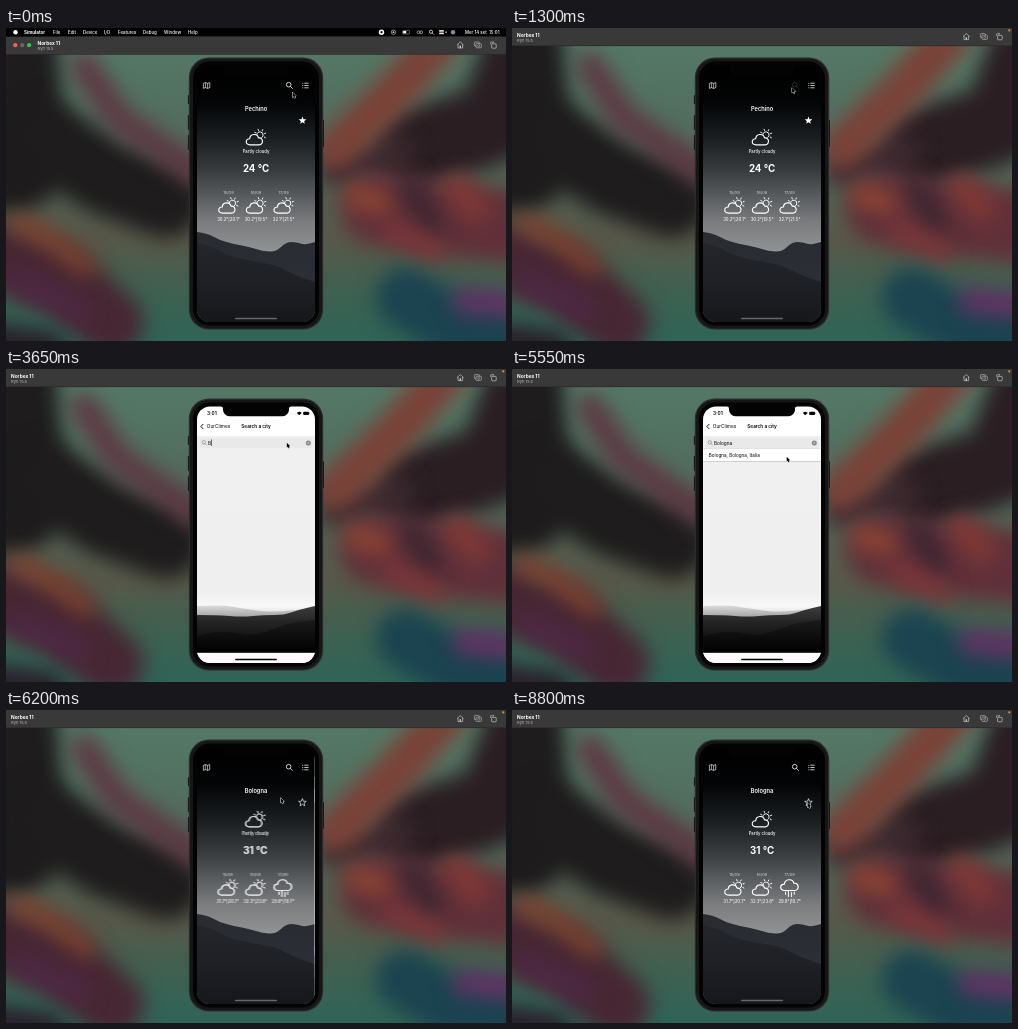
Recreate the animation shown at these times as an HTML page with a canvas. Size 500 px wide and 313 px high, loop 8850 ms.

```html
<!DOCTYPE html>
<html lang="it">
<head>
<meta charset="utf-8">
<title>Weather app</title>
<style>
html,body{margin:0;width:100%;height:100%;overflow:hidden;background:#222}
canvas{display:block;width:500px;height:313px}
</style>
</head>
<body>
<canvas id="stage"></canvas>
<script>
const W = 500, H = 313, LOOP = 8850;
const canvas = document.getElementById('stage');
const scale = Math.max(1, window.devicePixelRatio || 1);
canvas.width = W * scale;
canvas.height = H * scale;
let c = canvas.getContext('2d');

const FONT = 'Inter, "Liberation Sans", sans-serif';
const SCREEN = {x: 191, y: 37.5, w: 118, h: 256.5};
const clamp = v => Math.max(0, Math.min(1, v));
const span = (t, a, b) => clamp((t - a) / (b - a));
const mix = (a, b, p) => a + (b - a) * p;
const easeOut = p => 1 - (1 - p) ** 3;
const smooth = p => p * p * (3 - 2 * p);

function text(s, x, y, size, color = '#fff', weight = 400, align = 'left') {
  c.font = `${weight} ${size}px ${FONT}`;
  c.fillStyle = color;
  c.textAlign = align;
  c.fillText(s, x, y);
}
function rect(x, y, w, h, color) {
  c.fillStyle = color;
  c.fillRect(x, y, w, h);
}
function roundPath(x, y, w, h, r) {
  c.beginPath();
  c.moveTo(x + r, y);
  c.arcTo(x + w, y, x + w, y + h, r);
  c.arcTo(x + w, y + h, x, y + h, r);
  c.arcTo(x, y + h, x, y, r);
  c.arcTo(x, y, x + w, y, r);
  c.closePath();
}
function round(x, y, w, h, r, color) {
  roundPath(x, y, w, h, r);
  c.fillStyle = color;
  c.fill();
}
function dot(x, y, r, color) {
  c.beginPath();
  c.arc(x, y, r, 0, 7);
  c.fillStyle = color;
  c.fill();
}
function ring(x, y, r, color, width) {
  c.beginPath();
  c.arc(x, y, r, 0, 7);
  stroke(color, width);
}
function stroke(color, width) {
  c.strokeStyle = color;
  c.lineWidth = width;
  c.stroke();
}
// Polyline from a flat list of coordinates
function line(pts, color, width, close) {
  c.beginPath();
  for (let i = 0; i < pts.length; i += 2) c.lineTo(pts[i], pts[i + 1]);
  if (close) c.closePath();
  stroke(color, width);
}
function fade(y0, y1, ...stops) {
  const g = c.createLinearGradient(0, y0, 0, y1);
  stops.forEach(([p, col]) => g.addColorStop(p, col));
  return g;
}
// Smooth ridge filled down to the given bottom
function ridge(pts, bottom, fill) {
  const n = pts.length;
  c.beginPath();
  c.moveTo(pts[0], bottom);
  c.lineTo(pts[0], pts[1]);
  for (let i = 2; i < n - 2; i += 2)
    c.quadraticCurveTo(pts[i], pts[i + 1], (pts[i] + pts[i + 2]) / 2, (pts[i + 1] + pts[i + 3]) / 2);
  c.lineTo(pts[n - 2], pts[n - 1]);
  c.lineTo(pts[n - 2], bottom);
  c.fillStyle = fill;
  c.fill();
}

// Blurred wallpaper brush strokes: colour, width, points
const BANDS = [
  ['#1e1c1d', 110, -5, 0, 5, 130],
  ['#1e1c1d', 75, 40, 110, 100, 150, 160, 172],
  ['#5c3a44', 28, 78, 38, 112, 90, 190, 145],
  ['#472733', 66, -20, 225, 55, 250, 105, 295],
  ['#7d4230', 20, 12, 195, 45, 212, 80, 238],
  ['#4e2844', 26, 15, 255, 70, 280],
  ['#2a1f2b', 40, -10, 315, 40, 322],
  ['#2a1e23', 80, 525, 0, 490, 95, 410, 120],
  ['#3c2a30', 36, 330, 140, 390, 125],
  ['#7a4238', 42, 452, -10, 392, 60, 330, 122],
  ['#60303a', 72, 370, 180, 430, 190, 520, 200],
  ['#8c4434', 24, 350, 168, 375, 175],
  ['#7e3836', 30, 450, 160, 470, 180],
  ['#3c2630', 22, 405, 160, 425, 195],
  ['#80383a', 18, 385, 202, 430, 225],
  ['#1b4350', 60, 400, 270, 450, 300, 520, 310],
  ['#633064', 24, 458, 273, 520, 278]
];
function makeWallpaper() {
  const layer = document.createElement('canvas');
  layer.width = W;
  layer.height = H;
  const main = c;
  c = layer.getContext('2d');
  rect(0, 0, W, H, fade(20, H, [0, '#547866'], [.35, '#52695c'], [.65, '#58594a'], [.85, '#3c6152'], [1, '#2f6456']));
  c.filter = 'blur(10px)';
  c.lineCap = c.lineJoin = 'round';
  for (const [color, width, ...pts] of BANDS) line(pts, color, width);
  c = main;
  return layer;
}
const wallpaper = makeWallpaper();

function magnifier(x, y, r, color, width) {
  ring(x, y, r, color, width);
  line([x + r * .7, y + r * .7, x + r * 1.75, y + r * 1.75], color, width);
}

function menuBar(y) {
  c.save();
  c.translate(0, y);
  rect(0, 0, W, 8.5, '#000');
  dot(9.5, 4.2, 2.2, '#fff');
  text('Simulator', 18, 5.8, 4.5, '#fff', 700);
  const items = {File: 47, Edit: 62, Device: 77, 'I/O': 98, Features: 112, Debug: 137, Window: 158, Help: 182};
  for (const name in items) text(name, items[name], 5.8, 4.4, '#fff', 500);
  dot(375.5, 4.2, 2.7, '#fff');
  rect(374.5, 3.2, 2, 2, '#000');
  ring(387.5, 4.2, 2.2, '#ddd', .6);
  dot(387.5, 4.2, .9, '#ddd');
  roundPath(396.5, 2.4, 7, 3.6, 1);
  stroke('#aaa', .5);
  rect(397.2, 3, 3, 2.4, '#fff');
  ring(412.5, 4.2, 1.4, '#ddd', .6);
  ring(415.2, 4.2, 1.4, '#ddd', .6);
  magnifier(425, 3.8, 1.6, '#fff', .7);
  round(433, 2, 5, 1.8, .9, '#ddd');
  round(433, 4.5, 5, 1.8, .9, '#ddd');
  dot(440, 4.2, .9, '#f39a2b');
  dot(447, 4.2, 2.2, '#8a86a8');
  text('Mer 14 set  15:01', 493.5, 5.8, 4.4, '#fff', 500, 'right');
  c.restore();
}

function titleBar(m) {
  c.save();
  c.translate(0, 8.4 * m);
  rect(0, 0, W, 18, '#393939');
  rect(0, 17.6, W, .5, '#222');
  if (m > 0) {
    c.globalAlpha = m;
    dot(9.3, 8.8, 2.1, '#f4605a');
    dot(16.2, 8.8, 2.1, '#666');
    dot(23.1, 8.8, 2.1, '#32c748');
    c.globalAlpha = 1;
  }
  const x = mix(5, 31.5, m);
  text('Norbex 11', x, 8.5, 4.8, '#fff', 700);
  text('Ryn 15.5', x, 13.6, 4.1, '#b5b5b5');
  const col = '#c4c4c4';
  line([451, 8.6, 454.3, 5.6, 457.6, 8.6], col, .7);
  line([452, 8, 452, 11.6, 456.6, 11.6, 456.6, 8], col, .7);
  rect(453.6, 9.2, 1.4, 2.4, col);
  roundPath(468.4, 5.6, 5, 4, .7);
  stroke(col, .6);
  roundPath(470, 7.2, 5.4, 4.2, .7);
  c.fillStyle = '#393939';
  c.fill();
  stroke(col, .6);
  ring(472.7, 9.3, 1, col, .5);
  roundPath(485.6, 7.4, 4.6, 4.4, .7);
  stroke(col, .7);
  line([484.6, 8, 484.6, 5.8, 487.6, 5.8], col, .6);
  line([486.7, 4.8, 487.8, 5.8, 486.7, 6.8], col, .6);
  c.restore();
}

function phoneBody() {
  for (const [y, h] of [[67, 9], [87, 15], [107, 15]]) round(181.9, y, 3, h, .8, '#151515');
  round(315, 92, 3, 27, .8, '#151515');
  round(182.8, 29.6, 134.4, 272, 20, '#2c2c2d');
  round(184, 30.8, 132, 269.6, 19, '#161617');
  round(187, 33.6, 126, 264, 16.5, '#030303');
}

// Cloud outline, about 17 wide, centred on the origin
function cloudPath() {
  c.beginPath();
  c.moveTo(-5, 6.3);
  c.bezierCurveTo(-10, 6.3, -9.6, .2, -5.2, .2);
  c.bezierCurveTo(-4.8, -5, 2.6, -5.4, 3.6, -.6);
  c.bezierCurveTo(8.6, -1.4, 9, 6.3, 4.2, 6.3);
  c.closePath();
}
function weatherIcon(x, y, rain) {
  c.save();
  c.translate(x, y);
  c.lineCap = 'round';
  if (rain) {
    c.save();
    c.translate(.4, -4);
    c.scale(1.08, 1.05);
    cloudPath();
    stroke('#fff', 1.1);
    c.restore();
    for (const [dx, dy, n] of [[-4, 4, 2.6], [-1.2, 3, 5.6], [1.8, 4.4, 4.4], [4.6, 4, 2.6]])
      line([dx, dy, dx, dy + n], '#fff', 1);
  } else {
    c.beginPath();
    c.arc(4.1, -2.6, 3.1, Math.PI * 1.06, Math.PI * 2.32);
    stroke('#fff', 1);
    for (let i = 0; i < 5; i++) {
      const a = Math.PI * (1.15 + i * .25), u = Math.cos(a), v = Math.sin(a);
      line([4.1 + u * 4.6, -2.6 + v * 4.6, 4.1 + u * 6, -2.6 + v * 6], '#fff', .95);
    }
    c.save();
    c.translate(-1, .9);
    cloudPath();
    stroke('#fff', 1.15);
    c.restore();
  }
  c.restore();
}
function star(x, y, filled) {
  c.beginPath();
  for (let i = 0; i < 10; i++) {
    const a = -Math.PI / 2 + i * Math.PI / 5, r = i % 2 ? 1.7 : 4;
    c.lineTo(x + Math.cos(a) * r, y + Math.sin(a) * r);
  }
  c.closePath();
  c.lineJoin = 'round';
  if (filled) {
    c.fillStyle = '#fff';
    c.fill();
  } else stroke('#fff', .65);
}

const PLACES = {
  Pechino: {now: '24 °C', days: ['30.2°|20.1°', '30.2°|19.5°', '32.1°|21.5°'], star: true},
  Bologna: {now: '31 °C', days: ['31.7°|20.7°', '32.3°|23.8°', '29.8°|19.7°'], rain: true}
};

function forecast(place) {
  weatherIcon(249.9, 109.6);
  text('Partly cloudy', 250, 124.8, 4.25, '#fff', 500, 'center');
  text(place.now, 250, 143.8, 9.7, '#fff', 700, 'center');
  place.days.forEach((s, i) => {
    const x = 222.4 + i * 27.6;
    text(`${15 + i}/09`, x, 165.8, 4, '#d2d2d2', 400, 'center');
    weatherIcon(x, 177.9, place.rain && i === 2);
    text(s, x, 192.8, 4.25, '#f5f5f5', 500, 'center');
  });
}

function homeView(name, searchAlpha, ghost) {
  const place = PLACES[name];
  rect(191, 37, 118, 258, fade(37, 222,
    [0, '#000'], [.2, '#030405'], [.4, '#1b1f22'], [.56, '#373a3d'], [.69, '#54575a'], [.85, '#7a7c7e'], [1, '#909193']));
  ridge([191, 204, 201, 205, 213, 212, 228, 216, 244, 219, 256, 223, 270, 224, 280, 214, 291, 214, 298, 217, 309, 214], 295,
    fade(203, 260, [0, '#292b31'], [1, '#2c2f36']));
  ridge([191, 215, 204, 217, 222, 228, 246, 233, 270, 237, 288, 247, 309, 254], 295,
    fade(215, 294, [0, '#24262b'], [.5, '#1e2025'], [1, '#15171b']));

  line([197.4, 55.4, 199.4, 54.6, 201.6, 55.4, 203.8, 54.6, 203.8, 59.6, 201.6, 60.4, 199.4, 59.6, 197.4, 60.4], '#fff', .65, true);
  line([199.4, 54.6, 199.4, 59.6], '#fff', .6);
  line([201.6, 55.4, 201.6, 60.4], '#fff', .6);
  c.globalAlpha = searchAlpha;
  magnifier(282.7, 56.7, 2.3, '#fff', .8);
  c.globalAlpha = 1;
  for (const y of [55.2, 57.5, 59.8]) {
    dot(296.8, y, .5, '#fff');
    line([298.4, y, 302.6, y], '#fff', .75);
  }
  text(name, 250, 83.1, 5.7, '#fff', 600, 'center');
  star(296.5, 92.6, place.star);
  if (ghost) {
    c.globalAlpha = .6;
    forecast(place);
    c.translate(-1.1, 0);
    forecast(place);
    c.translate(1.1, 0);
    c.globalAlpha = 1;
  } else forecast(place);
  round(229, 289.8, 42, 1.4, .7, '#66676a');
}

const KEYS = [3650, 3850, 3950, 4100, 4200, 4300, 4350];
const BLINKS = [2100, 2475, 2725, 3150, 3375, 4550];

function searchView(t) {
  const typed = 'Bologna'.slice(0, KEYS.filter(k => t >= k).length);
  rect(191, 37, 118, 258, '#fff');
  rect(191, 67, 118, 217, fade(67, 246, [0, '#f0f0f0'], [.88, '#efefef'], [.95, '#f8f8f8'], [1, '#dedede']));
  ridge([191, 237, 215, 236, 235, 239, 260, 243, 280, 242, 309, 239], 284,
    fade(235, 249, [0, '#e2e2e2'], [1, '#a0a0a0']));
  ridge([191, 246, 210, 246, 236, 248, 258, 246, 278, 246, 292, 241, 309, 237], 284,
    fade(238, 270, [0, '#3c3c3c'], [.45, '#252525'], [1, '#121212']));
  ridge([191, 267, 205, 263, 226, 263, 248, 267, 270, 259, 284, 254, 309, 251], 284,
    fade(250, 284, [0, '#1b1b1b'], [1, '#000']));
  rect(191, 283.8, 118, 11, '#fdf9fd');
  round(229, 289.8, 42, 1.5, .75, '#000');

  text('3:01', 201, 46.2, 4.8, '#000', 600);
  for (let i = 0; i < 4; i++) dot(285.2 + i * 1.4, 44.8, .35, '#aaa');
  c.beginPath();
  c.moveTo(293.3, 46.2);
  c.arc(293.3, 46.2, 3.3, -Math.PI * .76, -Math.PI * .24);
  c.fillStyle = '#000';
  c.fill();
  round(297.2, 42.8, 5.8, 3.2, .9, '#000');
  rect(303.3, 43.8, .5, 1.2, '#555');

  line([197.3, 55, 194.8, 57.5, 197.3, 60], '#000', .95);
  text('OurClimes', 200.8, 59.3, 4.75, '#000');
  text('Search a city', 250, 59.3, 4.7, '#000', 600, 'center');

  round(193.5, 68.8, 113, 10.4, 2.5, '#e9e9ea');
  magnifier(197.8, 73.3, 1.7, '#77777b', .6);
  if (typed) {
    text(typed, 202, 75.8, 4.7, '#000');
    dot(302.3, 73.9, 2.5, '#858589');
    line([301.4, 73, 303.2, 74.8], '#eee', .5);
    line([303.2, 73, 301.4, 74.8], '#eee', .5);
  } else text('Search a city, address, etc...', 203, 75.8, 4.6, '#909094');
  if (BLINKS.filter(k => t >= k).length % 2) {
    c.font = `400 4.7px ${FONT}`;
    rect(202 + c.measureText(typed).width, 70.4, .7, 6.6, '#333');
  }
  if (t >= 5050) {
    rect(191, 79.6, 118, 12.8, '#fff');
    rect(191, 79.4, 118, .4, '#c4c4c6');
    rect(191, 92.2, 118, .6, '#b4b4b6');
    text('Bologna, Bologna, Italia', 196.8, 87.7, 4.6, '#000');
  }
}

function screen(t) {
  const push = easeOut(span(t, 1335, 1610));
  const pop = easeOut(span(t, 5940, 6240));
  const open = push - pop;
  const shift = SCREEN.w * (1 - open);
  c.save();
  roundPath(SCREEN.x, SCREEN.y, SCREEN.w, SCREEN.h, 13);
  c.clip();
  if (open < 1) {
    c.save();
    c.translate(-.3 * SCREEN.w * open, 0);
    const press = t < 2000 ? span(t, 1150, 1220) : 0;
    homeView(t < 5900 ? 'Pechino' : 'Bologna', 1 - .82 * press, t >= 6150 && t < 6350);
    c.restore();
  }
  if (open > 0) {
    c.save();
    c.translate(shift, 0);
    searchView(t);
    c.restore();
  }
  c.restore();
  // Notch
  c.beginPath();
  c.moveTo(214.5, 37);
  c.quadraticCurveTo(217, 37.3, 217, 39.5);
  c.arcTo(217, 47.2, 224, 47.2, 6.5);
  c.arcTo(283, 47.2, 283, 39.5, 6.5);
  c.lineTo(283, 39.5);
  c.quadraticCurveTo(283, 37.3, 285.5, 37);
  c.closePath();
  c.fillStyle = '#030303';
  c.fill();
}

// Start, end, target x, target y
const MOVES = [
  [0, 900, 280, 59.8],
  [2400, 2500, 280.8, 73.8],
  [5300, 5550, 274.7, 87.8],
  [7950, 8800, 295.6, 92.6]
];
function pointer(t) {
  let x = 286.6, y = 64.4;
  for (const [a, b, tx, ty] of MOVES) {
    const p = smooth(span(t, a, b));
    x = mix(x, tx, p);
    y = mix(y, ty, p);
  }
  c.save();
  c.translate(x, y);
  c.beginPath();
  for (const [px, py] of [[0, 0], [0, 4.9], [1.1, 3.9], [1.9, 5.7], [2.8, 5.3], [2, 3.6], [3.5, 3.5]]) c.lineTo(px, py);
  c.closePath();
  c.lineJoin = 'round';
  stroke('#fff', .9);
  c.fillStyle = '#000';
  c.fill();
  c.restore();
}

function draw(t) {
  const menu = 1 - smooth(span(t, 150, 500));
  c.setTransform(scale, 0, 0, scale, 0, 0);
  c.drawImage(wallpaper, 0, 0, W, H);
  phoneBody();
  screen(t);
  titleBar(menu);
  if (menu > 0) menuBar(-8.5 * (1 - menu));
  if (menu < 1) {
    c.globalAlpha = 1 - menu;
    dot(497.3, 2.4, 1.1, '#f08a24');
    c.globalAlpha = 1;
  }
  pointer(t);
}

const start = performance.now();
function tick() {
  draw((performance.now() - start) % LOOP);
  requestAnimationFrame(tick);
}
tick();
</script>
</body>
</html>
```
